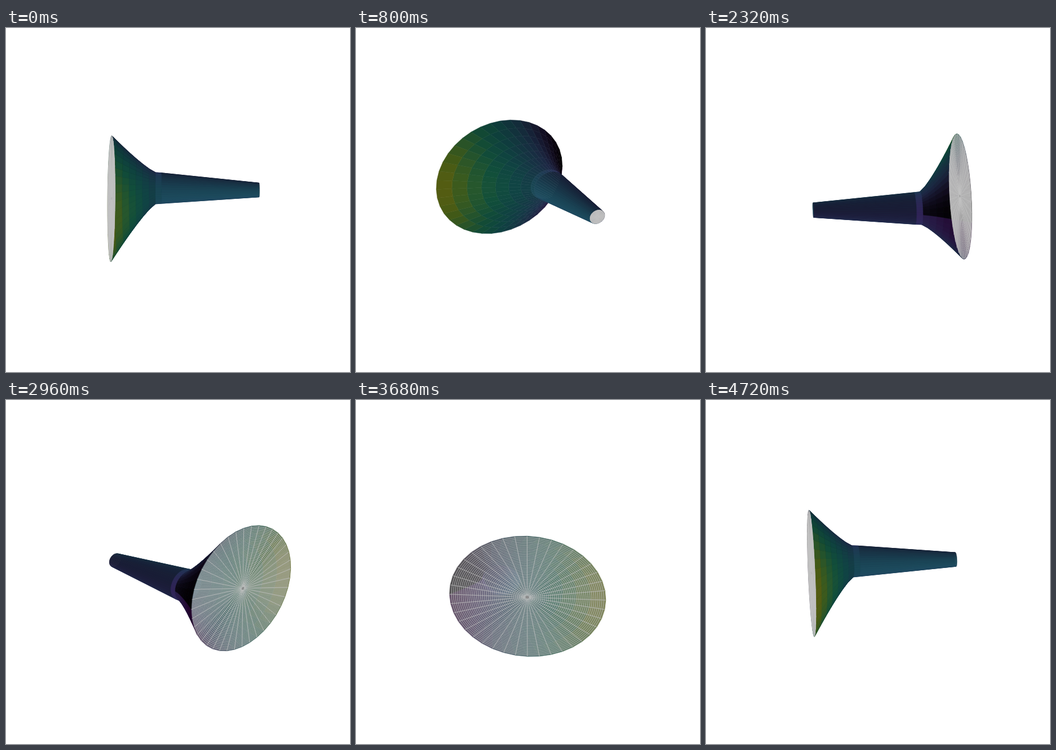
Recreate the animation shown at these times as an HTML page with a canvas. Size 600 by 600 pixels, loop 4.8 s.

```html
<!DOCTYPE html>
<html lang="en">
<head>
<meta charset="utf-8">
<title>Rotating horn</title>
<style>
html, body { margin: 0; width: 100%; height: 100%; overflow: hidden; background: #fff; }
canvas { display: block; width: 600px; height: 600px; }
</style>
</head>
<body>
<canvas id="stage" width="600" height="600"></canvas>
<script>
const ctx = document.getElementById('stage').getContext('2d');
const TAU = Math.PI * 2;
const STEP_MS = 80, STEPS = 60;
const SIDES = 40, CAP_RINGS = 40;
const RADIUS_H = 130.5, RADIUS_V = 107;
const ELEV = 20 * Math.PI / 180, DIST = 2500, CX = 314, CY = 297.5;
const SIN_E = Math.sin(ELEV), COS_E = Math.cos(ELEV);

const VIRIDIS = [
  [68, 1, 84], [71, 44, 122], [59, 81, 139], [44, 113, 142], [33, 144, 141],
  [39, 173, 129], [92, 200, 99], [170, 220, 50], [253, 231, 37]
];

function viridis(t) {
  const p = Math.min(Math.max(t, 0), 1) * 8;
  const i = Math.min(Math.floor(p), 7);
  return VIRIDIS[i].map((c, k) => c + (VIRIDIS[i + 1][k] - c) * (p - i));
}

// Cross-sections from the wide mouth to the tip: position, depth offset, radius.
const profile = [];
for (let i = 0; i <= 8; i++) {
  const r = i < 8 ? 0.255 + 0.745 * Math.pow(1 - i / 7, 1.2) : 0.248;
  profile.push({ x: -130 + 260 * i / 24, d: -1 - 53 * Math.min((1 - r) / 0.745, 1), r });
}
profile.push({ x: 129.5, d: -44.5, r: 0.113 });
const mouth = profile[0], tip = profile[9];

function ringPoint(ring, angle, scale = 1) {
  const r = ring.r * scale;
  return [ring.x, ring.d + RADIUS_H * r * Math.cos(angle), RADIUS_V * r * Math.sin(angle)];
}

function shade(band, angle) {
  const c = Math.cos(angle), s = Math.sin(angle);
  if (band > 7) return 0.53 + 0.1 * c - 0.1 * s;
  if (band === 7) return 0.64 - 0.05 * c - 0.04 * s;
  const inner = band / 7;
  const base = 0.41 + 0.1 * inner;
  if (s < 0) return base + 0.08 * Math.max(0, Math.cos(angle - 3.75));
  const g = Math.min(Math.max((angle - 1.75) / 1.25, 0), 1);
  return base * (1 - (0.92 - 0.3 * inner * inner) * g * g * (3 - 2 * g));
}

const faces = [];
for (let b = 0; b < 9; b++) {
  for (let j = 0; j < SIDES; j++) {
    const a = j / SIDES * TAU, c = (j + 1) / SIDES * TAU;
    const points = [
      ringPoint(profile[b], a), ringPoint(profile[b], c),
      ringPoint(profile[b + 1], c), ringPoint(profile[b + 1], a)
    ];
    const depth = points.reduce((sum, p) => sum + p[1], 0) / 4;
    const s = shade(b, (a + c) / 2);
    const rgb = viridis((depth + 126) / 262).map(v => Math.round(v * s));
    faces.push({ points, color: `rgb(${rgb})` });
  }
}

let cosT = 1, sinT = 0;

function project([x, d, z]) {
  const right = x * cosT - d * sinT;
  const toward = x * sinT + d * cosT;
  const near = toward * COS_E + z * SIN_E;
  const k = DIST / (DIST - near);
  return [CX + right * k, CY - (z * COS_E - toward * SIN_E) * k, near];
}

function trace(points) {
  points.forEach((p, i) => i ? ctx.lineTo(p[0], p[1]) : ctx.moveTo(p[0], p[1]));
}

function circle(ring, scale) {
  const pts = [];
  for (let j = 0; j < 80; j++) pts.push(project(ringPoint(ring, j / 80 * TAU, scale)));
  return pts;
}

function drawHorn() {
  const list = faces.map(f => {
    const pts = f.points.map(project);
    return { pts, color: f.color, near: pts.reduce((s, p) => s + p[2], 0) };
  }).sort((a, b) => a.near - b.near);
  ctx.lineWidth = 0.5;
  for (const f of list) {
    ctx.fillStyle = ctx.strokeStyle = f.color;
    ctx.beginPath();
    trace(f.pts);
    ctx.closePath();
    ctx.fill();
    ctx.stroke();
  }
}

function drawCap(ring) {
  ctx.fillStyle = 'rgba(191,191,191,0.43)';
  ctx.beginPath();
  trace(circle(ring, 1));
  ctx.fill();
  ctx.lineWidth = 0.9;
  ctx.strokeStyle = 'rgba(191,191,191,0.85)';
  for (let i = 1; i < CAP_RINGS; i++) {
    ctx.beginPath();
    trace(circle(ring, i / CAP_RINGS));
    ctx.closePath();
    ctx.stroke();
  }
  ctx.strokeStyle = 'rgba(194,194,194,0.9)';
  for (let j = 0; j < SIDES; j++) {
    const a = j / SIDES * TAU;
    ctx.beginPath();
    trace([project(ringPoint(ring, a, 0.025)), project(ringPoint(ring, a))]);
    ctx.stroke();
  }
  ctx.fillStyle = '#8c8c8c';
  ctx.beginPath();
  trace(circle(ring, 0.023));
  ctx.fill();
}

function nearest(ring) {
  return Math.max(...circle(ring, 1).map(p => p[2]));
}

function draw(step) {
  const turn = step / STEPS * TAU;
  cosT = Math.cos(turn);
  sinT = Math.sin(turn);
  ctx.fillStyle = '#fff';
  ctx.fillRect(0, 0, 600, 600);
  const tipFirst = nearest(mouth) >= nearest(tip);
  drawCap(tipFirst ? tip : mouth);
  drawHorn();
  drawCap(tipFirst ? mouth : tip);
}

const start = performance.now();
let shown = -1;
function tick() {
  const step = Math.floor((performance.now() - start) / STEP_MS) % STEPS;
  if (step !== shown) draw(shown = step);
  requestAnimationFrame(tick);
}
tick();
</script>
</body>
</html>
```
